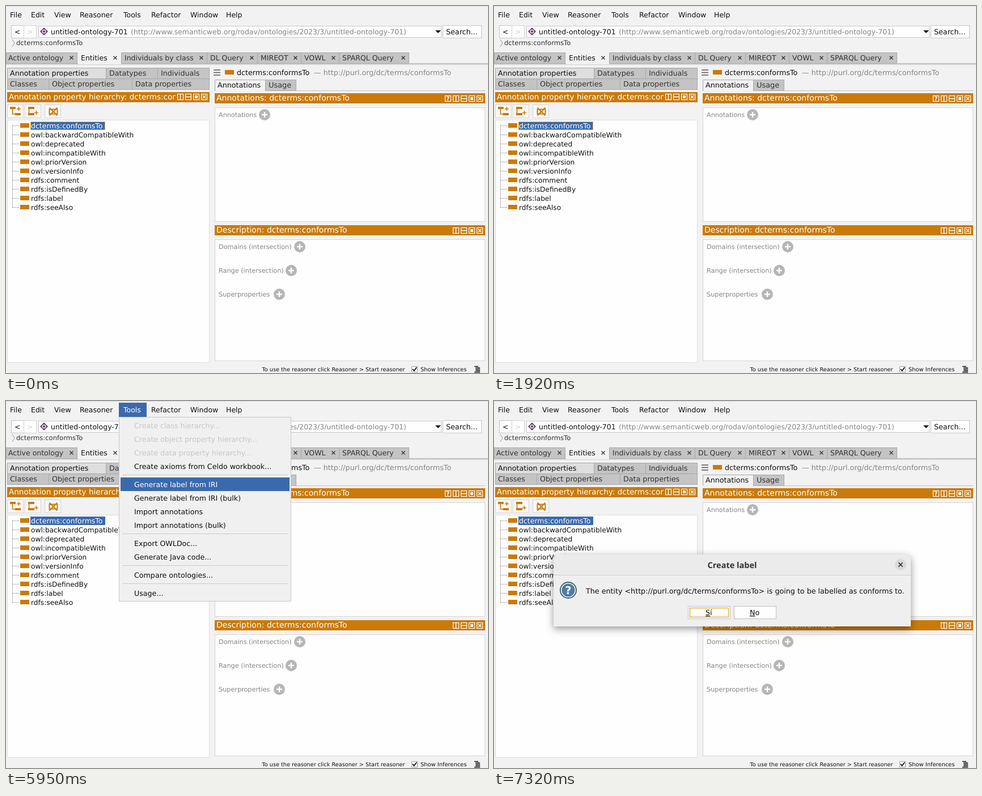
Write an HTML page that moves like this. It is 850 by 648 pixels and loops after 8000 ms.

```html
<!DOCTYPE html>
<html lang="en">
<head>
<meta charset="utf-8">
<title>Ontology editor</title>
<style>
html, body { margin: 0; width: 100%; height: 100%; overflow: hidden; background: #f2f2f2; }
svg { display: block; width: 850px; height: 648px; }
text { font-family: "DejaVu Sans", sans-serif; text-rendering: geometricPrecision; white-space: pre; }
.title { font: 700 14.5px "Open Sans", sans-serif; }
.u { text-decoration: underline; }

#ring, #menu, #first, #second, #dialog { animation: 8s step-end infinite; }
#ring { animation-name: ring; }
#menu { animation-name: menu; }
#first { animation-name: first; }
#second { animation-name: second; }
#dialog { animation-name: dialog; transform-origin: 420px 334.5px; filter: drop-shadow(0 4px 7px rgba(0, 0, 0, .42)); }

@keyframes ring { 0% { opacity: 1 } 58.125%, 100% { opacity: 0 } }
@keyframes menu { 0% { opacity: 0 } 58.125% { opacity: 1 } 83.625%, 100% { opacity: 0 } }
@keyframes first { 0% { opacity: 0 } 72.375% { opacity: 1 } 73.875%, 100% { opacity: 0 } }
@keyframes second { 0% { opacity: 0 } 74.375% { opacity: 1 } 83.625%, 100% { opacity: 0 } }
@keyframes dialog {
  0% { opacity: 0; transform: scaleY(0) }
  84% { opacity: .56; transform: scaleY(.56) }
  84.375% { opacity: .874; transform: scaleY(.874) }
  84.75% { opacity: .99; transform: scaleY(.99) }
  85.25%, 100% { opacity: 1; transform: scaleY(1) }
}
</style>
</head>
<body>
<svg id="stage" viewBox="0 0 850 648"></svg>
<script>
const BG = '#f2f2f2', TAB = '#c4c4c4', EDGE = '#a8a8a8', SOFT = '#d4d4d4', PAPER = '#fefefe',
      ORANGE = '#ca7a08', BLUE = '#3b69ae', INK = '#101010', DIM = '#333', GREY = '#858585';

const text = (x, y, s, size = 12.5, fill = INK, extra = '') =>
  `<text x="${x}" y="${y}" font-size="${size}" fill="${fill}" ${extra}>${s.replace(/</g, '&lt;')}</text>`;
const fillBox = (x, y, x2, y2, fill) =>
  `<rect x="${x}" y="${y}" width="${x2 - x}" height="${y2 - y}" fill="${fill}"/>`;
const frame = (x, y, x2, y2, fill, stroke, w = 1) =>
  `<rect x="${x + .5}" y="${y + .5}" width="${x2 - x - 1}" height="${y2 - y - 1}" fill="${fill}" stroke="${stroke}" stroke-width="${w}"/>`;
const path = (d, stroke, w = 1, extra = '') =>
  `<path d="${d}" fill="none" stroke="${stroke}" stroke-width="${w}" ${extra}/>`;
const cross = (x, y, r, stroke, w = 1.4) =>
  path(`M${x - r} ${y - r}l${2 * r} ${2 * r}m0 ${-2 * r}l${-2 * r} ${2 * r}`, stroke, w);
const plus = (x, y) =>
  `<circle cx="${x}" cy="${y}" r="10" fill="#b6b6b6"/>` + path(`M${x - 5} ${y}h10m-5 -5v10`, PAPER, 2.4);

// Small window buttons in the orange title bars
const marks = {
  help: (x, y) => text(x + 2.6, y + 9.3, '?', 10, '#fff', 'font-weight="700"'),
  split: (x, y) => path(`M${x + 5.5} ${y}v11`, '#fff', 1.5),
  stack: (x, y) => path(`M${x} ${y + 5.5}h11`, '#fff', 1.5),
  pop: (x, y) => fillBox(x + 3, y + 3, x + 8, y + 8, '#fff'),
  close: (x, y) => cross(x + 5.5, y + 5.5, 2.8, '#fff', 1.5)
};
const buttons = (x, y, names) => names.map((n, i) =>
  frame(x + i * 14, y, x + i * 14 + 11, y + 11, 'none', '#fff', 1.2) + marks[n](x + i * 14, y)).join('');
const basic = ['split', 'stack', 'pop', 'close'];

function topBars() {
  const menus = [['File', 7], ['Edit', 44], ['View', 85], ['Reasoner', 130], ['Tools', 207],
                 ['Refactor', 256], ['Window', 325], ['Help', 388]];
  const tabs = [['Active ontology', 0, 4, 126], ['Entities', 127, 132, 203], ['Individuals by class', 203, 209, 355],
                ['DL Query', 354, 360, 444], ['MIREOT', 443, 449, 521], ['VOWL', 520, 526, 588],
                ['SPARQL Query', 587, 593, 711]];
  return fillBox(0, 0, 850, 1, '#dadada') + menus.map(([s, x]) => text(x, 20, s)).join('') +
    frame(9, 34, 32, 57, PAPER, '#c4c4c4') + frame(31, 34, 54, 57, PAPER, SOFT) +
    text(15, 50, '<') + text(37, 50, '>', 12.5, '#d0d0d0') +
    frame(57, 35, 768, 56, PAPER, '#c8c8c8') +
    '<path d="M67 38l7 7l-7 7l-7 -7z" fill="#5b3a63"/><circle cx="67" cy="45" r="2.8" fill="#5b3a63" stroke="#f3e9ee" stroke-width="1.6"/>' +
    text(79, 50, 'untitled-ontology-701') +
    text(220, 50, '(http://www.semanticweb.org/rodav/ontologies/2023/3/untitled-ontology-701)', 12.5, GREY) +
    `<path d="M757 43h10l-5 5z" fill="${INK}"/>` +
    frame(770, 34, 839, 57, PAPER, '#c8c8c8') + text(776, 50, 'Search...', 12.7) +
    path('M11 59l4 6.5l-4 6.5', '#999') + text(18, 69, 'dcterms:conformsTo', 11.6, DIM) +
    fillBox(0, 101, 850, 104, '#d4d4d4') + fillBox(0, 101, 850, 102, '#b4b4b4') +
    tabs.map(([s, x, tx, x2], i) =>
      (i === 1 ? fillBox(x, 82, x2, 103, BG) : frame(x, 82, x2, 102, TAB, EDGE)) +
      text(tx, 96, s, 12.5, i === 1 ? INK : DIM) + cross(x2 - 10.5, 91.5, 3, DIM, 1.3)).join('');
}

function leftSide() {
  const tabs = [['Annotation properties', 2, 7, 177, 0], ['Datatypes', 176, 182, 268, 0], ['Individuals', 267, 273, 359, 0],
                ['Classes', 2, 7, 76, 1], ['Object properties', 75, 81, 223, 1], ['Data properties', 222, 228, 359, 1]];
  const tree = ['dcterms:conformsTo', 'owl:backwardCompatibleWith', 'owl:deprecated', 'owl:incompatibleWith',
                'owl:priorVersion', 'owl:versionInfo', 'rdfs:comment', 'rdfs:isDefinedBy', 'rdfs:label', 'rdfs:seeAlso'];
  const dots = 'stroke-dasharray="1 1"';
  return tabs.map(([s, x, tx, x2, row], i) =>
      frame(x, 109 + row * 19, x2, 129 + row * 19, i ? TAB : '#dedede', EDGE) +
      text(tx, row ? 142 : 123, s, 12.7, i ? DIM : INK)).join('') +
    fillBox(2, 152, 359, 170, ORANGE) +
    '<clipPath id="cut"><path d="M2 152h297v18h-297z"/></clipPath>' +
    text(5, 165, 'Annotation property hierarchy: dcterms:conformsTo', 13.55, '#fff', 'clip-path="url(#cut)"') +
    buttons(302, 155, basic) +
    [2, 33, 68].map(x => frame(x, 174, x + 29, 198, '#f8f8f8', SOFT)).join('') +
    fillBox(7, 178, 17, 182, ORANGE) + fillBox(16, 189, 26, 193, ORANGE) +
    path('M11.5 182v9h5M19 181.5h7m-3.5 -3.5v7', ORANGE, 1.6) +
    fillBox(39, 178, 50, 182, ORANGE) + fillBox(39, 189, 50, 193, ORANGE) +
    path('M40.5 182v7M50 188.5h7m-3.5 -3.5v7', ORANGE, 1.6) +
    frame(76, 182, 91, 191, 'none', ORANGE, 2) + cross(83.5, 186.5, 7, ORANGE, 2) +
    frame(2, 201, 359, 630, PAPER, '#dedede') +
    path('M11.5 211v145', '#777', 1, dots) +
    fillBox(43, 204, 175, 219, BLUE) + `<g id="ring">${frame(43, 204, 175, 219, 'none', '#eeb020')}</g>` +
    tree.map((s, i) => {
      const y = 211 + 16 * i;
      return path(`M12 ${y + .5}h11`, '#777', 1, dots) + fillBox(25, y - 4, 41, y + 4, ORANGE) +
        text(44, y + 5, s, i ? 12.2 : 12.5, i ? INK : '#fff');
    }).join('');
}

function rightSide() {
  const slots = [['Domains (intersection)', 425, 518], ['Range (intersection)', 467, 503], ['Superproperties', 509, 482]];
  return path('M366 113h12m-12 4.5h12m-12 4.5h12', '#555', 1.4) + fillBox(386, 113, 402, 121, ORANGE) +
    text(407, 122, 'dcterms:conformsTo', 12.7) +
    text(543, 122, '— http://purl.org/dc/terms/conformsTo', 12.7, GREY) +
    fillBox(368, 149, 845, 150, '#c0c0c0') + frame(457, 130, 512, 150, TAB, EDGE) +
    path('M368.5 150v-19.5h89v19.5', EDGE) + fillBox(369, 149, 457, 150, BG) +
    text(373, 144, 'Annotations', 12.7) + text(463, 144, 'Usage', 12.9, DIM) +
    fillBox(368, 154, 845, 172, ORANGE) + text(371, 167, 'Annotations: dcterms:conformsTo', 14, '#fff') +
    buttons(774, 158, ['help', ...basic]) +
    frame(368, 179, 845, 381, PAPER, SOFT) +
    text(375, 196, 'Annotations', 11.2, GREY) + plus(456, 192) +
    fillBox(368, 387, 845, 405, ORANGE) + text(371, 400, 'Description: dcterms:conformsTo', 14, '#fff') +
    buttons(788, 391, basic) +
    frame(368, 412, 845, 627, PAPER, SOFT) +
    slots.map(([s, y, x]) => text(375, y + 4, s, 11.25, GREY) + plus(x, y)).join('') +
    text(451.5, 645, 'To use the reasoner click Reasoner > Start reasoner', 9.7) +
    frame(715, 636, 726, 647, PAPER, '#a4a4a4') + path('M717 641l2.6 3l4.6 -6', INK, 1.8) +
    text(731, 645, 'Show Inferences', 9.9) +
    path('M826 636.5h7m-5 2.5h8m-8 2.5h8m-8 2.5h8m-10 2.5h10', INK, 1.3);
}

function toolsMenu() {
  const items = [['Create class hierarchy...', 43], ['Create object property hierarchy...', 67],
    ['Create data property hierarchy...', 91], ['Create axioms from Celdo workbook...', 115],
    ['Generate label from IRI', 147], ['Generate label from IRI (bulk)', 171], ['Import annotations', 195],
    ['Import annotations (bulk)', 219], ['Export OWLDoc...', 251], ['Generate Java code...', 275],
    ['Compare ontologies...', 307], ['Usage...', 339]];
  const item = ([s, y], fill) => text(226, y + 5, s, 12.65, fill);
  const hover = (id, i) => `<g id="${id}">${fillBox(202, items[i][1] - 12, 500, items[i][1] + 12, BLUE)}${item(items[i], '#fff')}</g>`;
  return '<g id="menu">' + fillBox(199, 3, 248, 28, BLUE) + text(207, 20, 'Tools', 12.5, '#fff') +
    frame(199, 28, 503, 354, '#f0f0f0', '#c6c6c6') +
    [130, 234, 290, 322].map(y => fillBox(206, y, 497, y + 1, '#cbcbcb')).join('') +
    items.map((it, i) => item(it, i < 3 ? '#c6c6c6' : INK)).join('') +
    hover('first', 3) + hover('second', 4) + '</g>';
}

function labelDialog() {
  return '<g id="dialog">' +
    '<path d="M105 398V281q0 -10 10 -10H725q10 0 10 10V398z" fill="#efefef"/>' +
    '<path d="M105 307V281q0 -10 10 -10H725q10 0 10 10V307z" fill="#ebebeb"/>' +
    fillBox(105, 307, 735, 308, '#d0d0d0') +
    '<text class="title" x="420" y="295" text-anchor="middle" fill="#333">Create label</text>' +
    '<circle cx="717" cy="289" r="10" fill="#d9d9d9"/>' + cross(717, 289, 3.6, DIM, 1.6) +
    '<circle cx="131" cy="334" r="14" fill="#4f7ca4" stroke="#45606c" stroke-width="2"/>' +
    '<circle cx="131" cy="334" r="12.3" fill="none" stroke="#f4f4f4" stroke-width="1.6"/>' +
    text(131, 341, '?', 19, '#fff', 'font-weight="700" text-anchor="middle"') +
    text(162, 340, 'The entity <http://purl.org/dc/terms/conformsTo> is going to be labelled as conforms to.', 12.7) +
    frame(342, 362, 417, 385, PAPER, '#c0c0c0') + frame(345, 365, 414, 382, 'none', '#e6a51e', 1.3) +
    frame(423, 362, 498, 385, PAPER, '#c0c0c0') +
    `<text x="373" y="378" font-size="12.7" fill="${INK}"><tspan class="u">S</tspan>í</text>` +
    `<text x="451" y="378" font-size="12.7" fill="${INK}"><tspan class="u">N</tspan>o</text></g>`;
}

document.getElementById('stage').innerHTML =
  fillBox(0, 0, 850, 648, BG) + topBars() + leftSide() + rightSide() + toolsMenu() + labelDialog();
</script>
</body>
</html>
```
